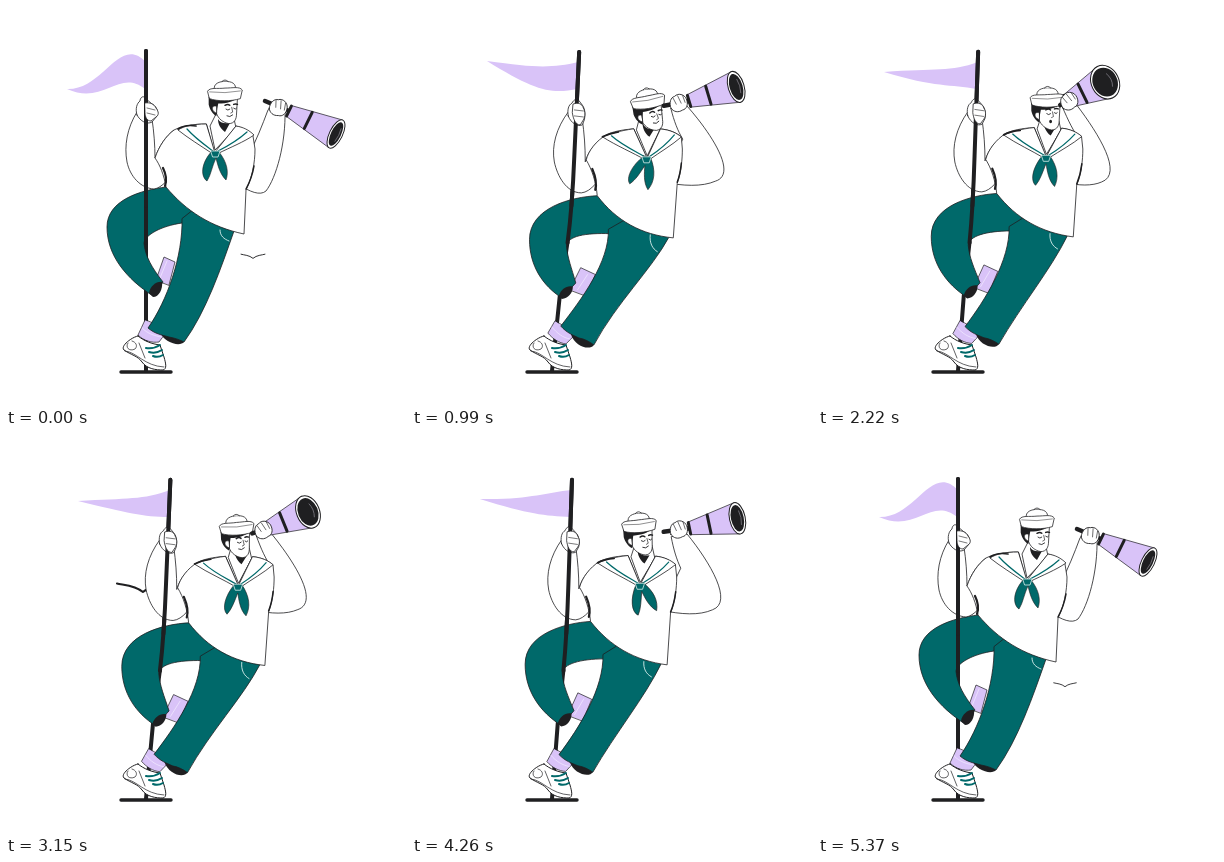
These frames come from a looping animation (400x400 px, 5.4 s). An HTML page:

```html
<!DOCTYPE html>
<html lang="en">
<head>
<meta charset="utf-8">
<title>Sailor on lookout</title>
<style>
  html, body { margin: 0; width: 100%; height: 100%; overflow: hidden; background: #fff; }
  svg { display: block; width: 100vw; height: 100vh; }
</style>
</head>
<body>
<svg id="stage" viewBox="0 0 400 400"></svg>
<script>
const LOOP = 5400;
const TEAL = '#00696a', LILAC = '#d9c3f8', INK = '#1f1f21', WHITE = '#fff';
const stage = document.getElementById('stage');

// Looping monotone cubic through [time, value] pairs.
function track(...keys) {
  const n = keys.length;
  const key = i => {
    const turn = Math.floor(i / n), [t, v] = keys[i - turn * n];
    return [t + turn * LOOP, v];
  };
  const rate = i => {
    const [a, b] = [key(i), key(i + 1)];
    return (b[1] - a[1]) / (b[0] - a[0]);
  };
  const slope = i => {
    const p = rate(i - 1), q = rate(i);
    return p * q <= 0 ? 0 : 2 * p * q / (p + q);
  };
  return t => {
    let i = -1;
    while (key(i + 1)[0] <= t) i++;
    const [t0, v0] = key(i), [t1, v1] = key(i + 1);
    const w = t1 - t0, s = (t - t0) / w, r = 1 - s;
    return v0 * (1 + 2 * s) * r * r + slope(i) * w * s * r * r
         + v1 * s * s * (3 - 2 * s) - slope(i + 1) * w * s * s * r;
  };
}

const tracks = {
  lean: track([60, 0], [600, .47], [990, .97], [1080, 1], [1710, .87], [2220, .72],
              [2390, .7], [3150, .87], [3720, 1], [3800, 1.01], [4740, .26], [5300, 0]),
  arm: track([60, 0], [600, .5], [1030, 1], [3850, 1], [4740, .7], [5330, 0]),
  turn: track([0, 0], [1000, 0], [2220, .97], [2390, 1], [2850, .82], [3150, .58], [3740, 0]),
  head: track([60, 0], [600, .38], [1060, 1], [2220, .68], [2390, .64], [3150, .72],
              [3740, 1], [4740, 0], [5300, 0]),
  scarf: track([60, 0], [550, 14], [990, 12], [1500, 0], [3700, 0], [4300, -18], [4740, -24], [5320, 0]),
  birdX: track([0, 247], [990, 281], [1720, 330], [2220, 226], [3150, 137], [3720, 97], [3960, 86], [5280, 247]),
  birdY: track([0, 251], [990, 168], [1720, 126], [2220, 165], [3150, 155], [3720, 85], [3960, 64], [5280, 252]),
  birdSize: track([0, .46], [990, .57], [1720, .7], [3150, 1], [3960, 1], [5280, .3]),
};

// Flag control heights at the moments where its wave changes shape.
const flagTimes = [0, 990, 2220, 3150, 3720, 4740, 5370];
const flagTrack = (...values) => track(...values.map((v, i) => [flagTimes[i], v]));
const flag = {
  tipX: flagTrack(61, 75, 66, 72, 74, 62, 61),
  tipY: flagTrack(83, 55, 66, 67, 64, 67, 83),
  top1: flagTrack(28, 62, 66, 66, 62, 54, 28),
  top2: flagTrack(84, 62, 62, 64, 66, 66, 84),
  low1: flagTrack(62, 88, 78, 83, 84, 77, 62),
  low2: flagTrack(100, 86, 82, 79, 78, 85, 100),
};

function add(name, attrs, parent = stage) {
  const el = document.createElementNS('http://www.w3.org/2000/svg', name);
  for (const k in attrs) el.setAttribute(k, attrs[k]);
  return parent.appendChild(el);
}
const look = (fill, width = .8, stroke = INK) => ({
  fill, stroke: width ? stroke : 'none', 'stroke-width': width,
  'stroke-linecap': 'round', 'stroke-linejoin': 'round',
});
const mix = (a, b, k) => a + (b - a) * k;

// A path morphing from pose a to pose b, and optionally on to pose c.
const parts = [];
function part(style, by, a, b, c = b) {
  const nums = s => s.match(/-?[\d.]+/g).map(Number);
  const p = { el: add('path', style), by, words: a.split(/-?[\d.]+/), a: nums(a), b: nums(b), c: nums(c) };
  parts.push(p);
  return p.el;
}
const body = (style, a, b) => part(style, 'lean', a, b);
const group = () => add('g');
const draw = (g, d, style = look('none')) => add('path', { d, ...style }, g);

const bird = add('path', look('none', 2));
const flagShape = add('path', look(LILAC, 0));

// Base, far foot and lower pole
add('path', { d: 'M115 366H165', ...look('none', 3.4) });
body(look('none', 4), 'M140 365 L140 290 Q140 262 140 236', 'M140 365 L148 290 Q152 262 156 236');
body(look(LILAC, .7), 'M150 274 L158 251 L169 256 L163 279 Z', 'M158 284 L169 262 L184 269 L174 290 Z');
body(look('none', .7, '#f3ebff'), 'M154 272 L161 255', 'M166 284 L176 269');

// Standing foot
body(look(LILAC, .7), 'M139 314 L132 329 C138 335 146 337 153 336 L162 324 Z',
                      'M143 315 L136 327 C141 333 147 337 154 338 L164 328 Z');
body(look('none', .7, '#f3ebff'), 'M136 322 C142 328 149 330 156 331', 'M140 321 C145 327 151 332 158 333');
add('path', { d: 'M132 330C126 331 114 340 118 344C125 349 132 350 136 356C141 363 150 364 157 364C161 363 160 358 158 351L154 339C146 338 138 335 132 330Z', ...look(WHITE, 1) });
add('path', { d: 'M122 337C119 341 123 346 129 343C132 340 130 336 126 335M119 345C131 346 138 360 158 361M133 337L139 352', ...look('none', .7) });
add('path', { d: 'M140 342Q148 343 154 339M143 346Q150 348 156 344M147 350Q152 352 157 349', ...look('none', 2, TEAL) });

// Trousers, with the pole passing between thigh and calf
body(look(TEAL),
  'M160 181 C135 184 101 194 101 221 C101 250 121 273 147 290 L157 276 C146 262 139 250 138 237 C139 229 155 220 176 217 L222 222 Z',
  'M186 190 C160 191 118 202 118 234 C118 260 131 280 150 292 L164 277 C160 262 156 252 155 240 C156 230 174 227 199 228 L245 228 Z');
body(look(INK, 0), 'M143 287 C144 280 151 275 156 276 C157 283 153 291 147 291 Z',
                   'M147 290 C149 283 156 279 161 281 C161 287 156 293 150 293 Z');
body(look('none', 4), 'M140 237 Q140 200 140 150 L140 45', 'M156 237 Q161 200 163 150 L168 46');
body(look(INK, 0), 'M154 326 C160 326 177 332 178 336 C174 341 158 337 154 326 Z',
                   'M159 328 C165 328 182 335 182 339 C178 345 163 341 159 328 Z');
body(look(TEAL),
  'M176 213 C177 250 161 295 142 322 C149 328 156 329 163 331 C169 332 174 334 178 336 C200 306 215 262 228 225 L195 198 Z',
  'M197 224 C198 256 170 293 149 320 C155 327 161 329 167 332 C173 333 178 336 182 339 C205 296 240 264 258 231 L225 208 Z');
body(look('none', .9, '#d8efed'), 'M214 224 C214 230 218 233 223 235', 'M239 229 C238 237 241 243 246 246');

// Arms
body(look(WHITE),
  'M131 106 C121 122 118 140 121 156 C124 170 134 182 148 183 C156 182 164 172 172 160 L168 124 C160 130 153 140 149 152 C149 140 148 126 146 113 Z',
  'M157 106 C145 122 140 140 143 156 C146 170 155 187 170 187 C180 186 188 174 192 165 L197 129 C185 135 177 145 174 156 C174 140 173 128 171 113 Z');
body(look(WHITE),
  'M131 109 C129 103 131 97 134 95 C134 92 137 89 139 92 L146 98 C150 100 153 105 151 110 L146 116 C141 119 134 115 131 109 Z',
  'M157 110 C156 104 157 99 161 97 C162 94 166 92 168 95 L171 99 C174 103 174 109 173 114 L171 119 C167 121 160 118 157 110 Z');
body(look('none', 4), 'M140 200 Q140 175 140 150 L140 45', 'M160 200 Q162 175 163 150 L168 46');
body(look(WHITE),
  'M139 97 C144 96 148 98 150 102 C153 106 153 109 150 111 L145 115 C141 115 139 111 139 107 Z',
  'M162 98 C167 96 171 98 172 102 C174 106 174 110 172 114 L169 119 C164 119 162 113 161 107 Z');
body(look('none', .6), 'M141 102 L149 104 M141 107 L149 109', 'M163 104 L172 105 M163 110 L172 111');
part(look(WHITE), 'arm',
  'M262 104 C256 120 250 135 243 148 L232 178 C244 186 254 190 260 185 C270 172 280 138 279 104 Z',
  'M259 103 C262 115 266 125 271 133 L250 176 C272 180 290 181 304 175 C326 168 300 128 275 100 Z',
  'M244 101 C250 115 255 125 261 133 L246 176 C260 180 274 180 283 176 C305 168 280 128 259 100 Z');

// Neck and shirt
body(look(WHITE), 'M210 108 L204 120 L209 144 L230 122 L227 108 Z', 'M228 112 L225 124 L236 150 L248 125 L245 112 Z');
body(look(INK, 0), 'M212 113 C214 117 218 118 224 117 L219 126 C214 122 212 118 212 113 Z',
                   'M231 116 C233 122 237 124 243 123 L238 131 C233 127 231 122 231 116 Z');
body(look(WHITE),
  'M200 118 C187 118 176 120 168 124 C160 130 153 140 149 152 C154 159 158 169 160 181 C180 205 205 221 238 228 L240 184 C246 172 249 157 249 143 L247 130 C242 125 237 122 230 120 L209 147 Z',
  'M222 123 C210 124 201 126 195 129 C185 135 177 145 175 154 C181 164 185 177 186 190 C205 215 230 229 262 232 L266 177 C270 165 271 153 271 143 L270 131 C265 127 259 124 249 123 L236 152 Z');
body(look('none', 2.2), 'M157 162 C160 168 161 174 159 180', 'M181 163 C184 170 186 177 184 184');
body(look('none', 1.5), 'M248 160 Q246 172 240 183', 'M270 157 Q269 168 266 176');

// Collar and scarf
body(look(WHITE), 'M200 118 C187 118 178 120 172 124 C182 132 195 140 207 148 L211 148 C225 141 238 136 248 129 C243 124 237 121 230 120 L209 146 Z',
                  'M222 123 C208 125 199 128 191 131 C205 140 222 147 234 154 L238 154 C249 146 261 139 270 131 C265 127 259 124 249 123 L236 152 Z');
body(look('none', 1.7), 'M172 123 C178 119 184 119 190 120', 'M191 131 C197 128 201 127 207 126');
body(look('none', 1.2, TEAL), 'M181 123 C190 133 199 139 207 145 M241 126 C231 135 222 140 212 145',
                              'M200 130 C210 139 223 145 234 151 M263 129 C255 139 247 145 238 151');
const scarf = body(look(TEAL, .6),
  'M206 145 L213 146 C221 156 223 166 220 174 C214 168 212 160 210 152 C206 160 205 169 201 175 C195 171 194 158 206 145 Z',
  'M232 151 L239 151 C247 163 248 174 243 183 C237 177 236 167 235 160 C232 168 229 176 224 181 C219 176 222 163 232 151 Z');
body(look(TEAL, .8, '#d8efed'), 'M205 145 L214 145 L212 151 L207 151 Z', 'M231 151 L240 151 L238 157 L233 157 Z');

// Head, around the middle of the hat
const head = group();
draw(head, 'M-10 8L-9 24C-7 30 -2 34 4 35C10 35 12 30 12 25L13 8Z', look(WHITE));
draw(head, 'M-17 7L-17 15C-16 20 -13 25 -9 27L-8 19L-7 14C2 14 9 12 13 8Z', look(INK, 0));
draw(head, 'M-9 17C-14 15 -15 22 -9 24Z', look(WHITE, .6));
const face = group();
head.append(face);
draw(face, 'M0 16Q3 14 5 16M9 15Q11 14 13 15', look('none', 1.5));
draw(face, 'M1 20Q3 22 5 20M9 19Q11 21 12 19', look('none', .9));
draw(face, 'M7 18L8 23L6 24', look('none', .7));
const smile = draw(face, 'M2 27Q5 29 8 26', look('none', .9));
const gasp = add('ellipse', { cx: 5, cy: 28, rx: 1.5, ry: 1.8, fill: INK }, face);
draw(head, 'M-11 0C-13 -7 -5 -9 0 -9C7 -9 12 -7 11 0Z', look(WHITE));
draw(head, 'M-3 -9Q0 -12 3 -9', look(WHITE));
draw(head, 'M-18 1C-16 -3 -8 -1 0 -2C8 -2 15 -4 18 0L16 9C6 12 -8 12 -16 9Z', look(WHITE));
draw(head, 'M-16 2Q0 4 16 1', look('none', .5));

// Spyglass and the hand holding it
const rod = add('path', look('none', 4.5));
const cone = add('path', look(LILAC, .7));
const bands = add('path', look('none', 3));
const rim = add('ellipse', look(WHITE, 1));
const lens = add('ellipse', look(INK, 0));
const glint = add('path', look('none', .8, '#77747c'));
const hand = group();
draw(hand, 'M-8 4C-9 -2 -6 -7 -2 -7C2 -10 8 -7 9 -2C10 4 7 8 3 8C-2 10 -6 8 -8 4Z', look(WHITE));
draw(hand, 'M-4 -6L-2 1M1 -7L3 1M6 -6L7 1', look('none', .6));

const set = (el, attrs) => { for (const k in attrs) el.setAttribute(k, attrs[k]); };

function drawFlag(t, lean) {
  const p = 140 + 27.5 * lean, f = {};
  for (const k in flag) f[k] = flag[k](t);
  const tip = `${f.tipX} ${f.tipY}`, near = p - 27, far = p - 42;
  set(flagShape, { d: `M${p} 56C${near} ${f.top1} ${far} ${f.top2} ${tip}C${far} ${f.low2} ${near} ${f.low1} ${p - 1} 83Z` });
}

function drawBird(t, p) {
  const up = Math.cos(t / LOOP * 10 * Math.PI), tip = -2 - 4 * up, bow = -3 - up;
  const shown = t > 5270 || t < 3980;
  set(bird, {
    d: `M-26 ${tip}C-19 ${bow} -8 ${bow} 0 3C8 ${bow} 19 ${bow} 26 ${tip}`,
    transform: `translate(${p.birdX} ${p.birdY}) scale(${p.birdSize})`,
    visibility: shown ? 'visible' : 'hidden',
  });
}

function drawGlass({ arm, turn }) {
  const pose = (a, b, c) => mix(a, b, arm) + (c - b) * turn;
  const arc = 4 * arm * (1 - arm);
  const x0 = pose(259, 252, 242) - 3 * arc, y0 = pose(95, 100, 99) - 6 * arc;
  const x1 = pose(330, 324, 286) + 3 * arc, y1 = pose(128, 80.5, 76);
  const xc = pose(283, 277, 248), yc = pose(105, 95, 95) - 5 * arc;
  const rx = pose(6.5, 8, 14), ry = pose(15.5, 16, 17.5), thin = pose(6, 6.5, 7);
  const angle = Math.atan2(y1 - yc, x1 - xc), deg = angle * 180 / Math.PI;
  const nx = -Math.sin(angle), ny = Math.cos(angle);
  const side = (s, sign) => {
    const w = mix(thin, ry, s) * sign;
    return `${mix(xc, x1, s) + nx * w} ${mix(yc, y1, s) + ny * w}`;
  };
  const ring = s => `M${side(s, -.9)}L${side(s, .9)}`;
  set(rod, { d: `M${x0} ${y0}L${xc} ${yc}` });
  set(cone, { d: `M${side(0, -1)}L${side(1, -1)}L${side(1, 1)}L${side(0, 1)}Z` });
  set(bands, { d: ring(0) + ring(.41) });
  const spin = `translate(${x1} ${y1}) rotate(${deg})`;
  set(rim, { rx, ry, transform: spin });
  set(lens, { rx: rx - 1.5, ry: ry - 2.6, transform: spin });
  set(glint, { d: `M${rx * .35} -7Q${rx * .6} 0 ${rx * .35} 7`, transform: spin });
  set(hand, { transform: `translate(${pose(272, 266, 250) - arc} ${pose(101, 97, 95) - 7 * arc}) rotate(${pose(18, -12, -25)})` });
}

function drawHead({ head: h, turn }) {
  const x = mix(219, 236, h) - turn, y = mix(84, 92, h) + turn;
  set(head, { transform: `translate(${x} ${y}) rotate(${-9 * h * (1 - turn)}) scale(.96)` });
  set(face, { transform: `translate(${-2 * turn} ${-2 * turn})` });
  set(smile, { visibility: turn > .7 ? 'hidden' : 'visible' });
  set(gasp, { visibility: turn > .7 ? 'visible' : 'hidden' });
}

function frame(now) {
  const t = now % LOOP, p = {};
  for (const k in tracks) p[k] = tracks[k](t);
  for (const { el, by, words, a, b, c } of parts) {
    const at = i => (mix(a[i], b[i], p[by]) + (c[i] - b[i]) * p.turn).toFixed(2);
    set(el, { d: words.map((w, i) => i < a.length ? w + at(i) : w).join('') });
  }
  set(scarf, { transform: `rotate(${p.scarf} ${mix(209.5, 235.5, p.lean)} ${mix(147, 153, p.lean)})` });
  drawFlag(t, p.lean);
  drawBird(t, p);
  drawGlass(p);
  drawHead(p);
  requestAnimationFrame(() => frame(performance.now() - start));
}
const start = performance.now();
frame(0);
</script>
</body>
</html>
```
